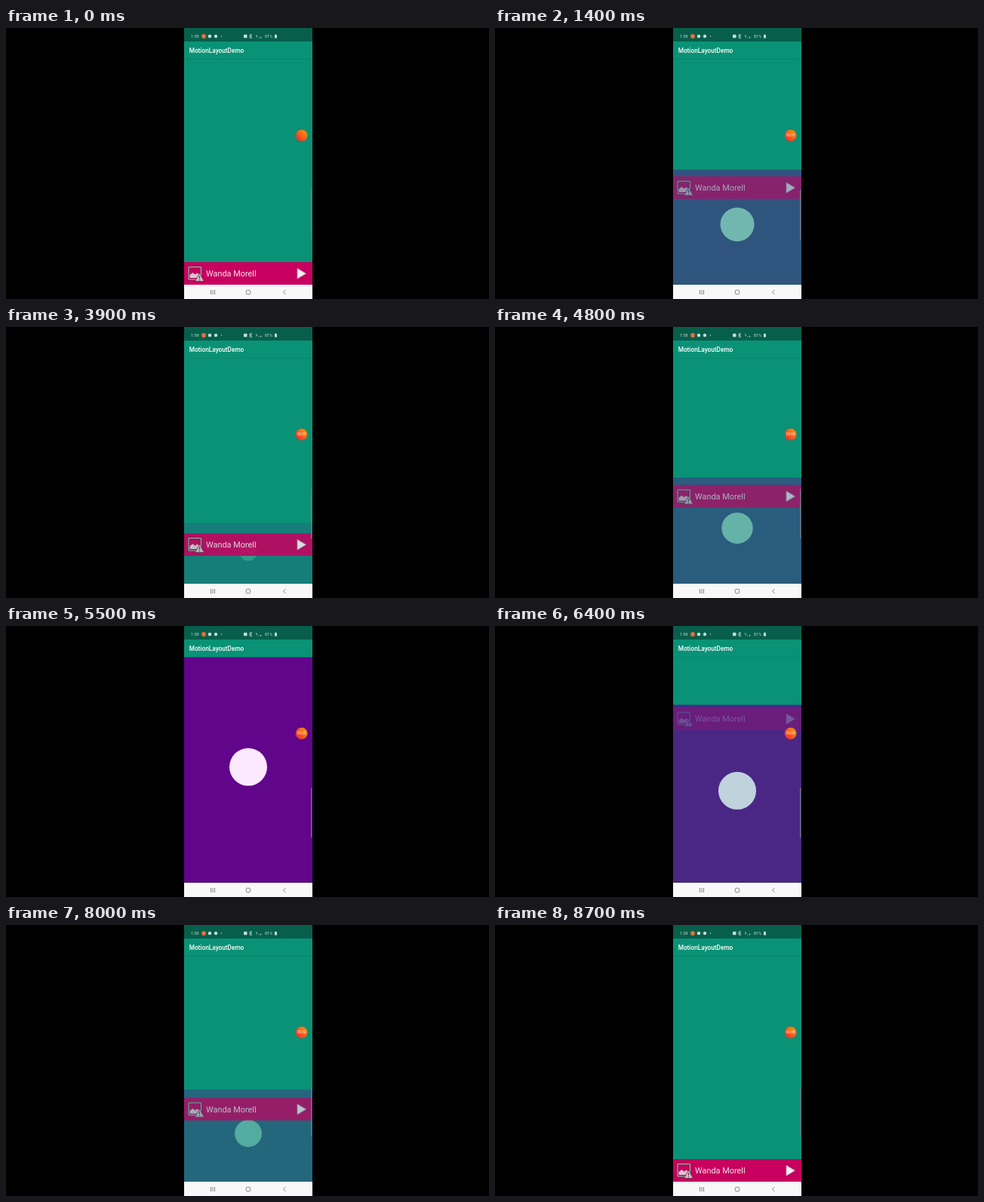
Recreate the animation shown at these times as an HTML page. Size 640 by 360 pixels, loop 8.9 s.

```html
<!DOCTYPE html>
<html lang="en">
<head>
<meta charset="utf-8">
<title>MotionLayoutDemo</title>
<style>
  html, body { margin: 0; width: 100%; height: 100%; overflow: hidden; background: #000; }
  svg { display: block; width: 100vw; height: 100vh; font-family: Roboto, sans-serif; }
</style>
</head>
<body>
<svg viewBox="0 0 640 360">
  <defs>
    <linearGradient id="glow" x1="0" y1="1" x2="1" y2="0">
      <stop offset=".1" stop-color="#f02c32"/>
      <stop offset=".9" stop-color="#fb9a08"/>
    </linearGradient>
  </defs>

  <rect width="640" height="360"/>
  <rect x="236" width="170" height="341" fill="#0a9276"/>
  <rect x="236" y="41" width="170" height="1" fill="#078067" opacity=".6"/>

  <!-- Expanding panel -->
  <g id="panel">
    <rect id="sheet" x="236" width="170" fill="#61058b"/>
    <rect x="236" y="340" width="170" height="1" fill="#2b0240" opacity=".6"/>
    <circle id="badge" cx="321" fill="#fce9ff"/>
  </g>

  <!-- Player bar, drawn relative to its top edge -->
  <g id="bar">
    <rect x="236" width="170" height="30" fill="#c8005f"/>
    <g stroke-linejoin="round">
      <rect x="242" y="6.5" width="16.5" height="16.5" fill="none" stroke="#5c2942" stroke-width="2.4"/>
      <rect x="242" y="6.5" width="16.5" height="16.5" fill="none" stroke="#d8b3c4"/>
      <path d="M243.5 21v-4l4-3 3 2.5 3-2 3 2v4.5z" fill="#e0c3d0"/>
      <path d="M256.5 14.5l6 11h-12z" fill="#d9b9c8" stroke="#5c2942" stroke-width=".8"/>
      <path d="M256.5 18.2v3.6m0 1.2v1.2" stroke="#5c2942" stroke-width="1.1"/>
    </g>
    <text x="265" y="19.2" font-size="10.9" fill="#fae3ee">Wanda Morell</text>
    <path d="M386 8.3v13.8l11.5-6.9z" fill="#f6eef2" stroke="#b8a0ac" stroke-width=".8" stroke-linejoin="round"/>
  </g>

  <!-- Status bar and title -->
  <rect x="236" width="170" height="18" fill="#075f4b"/>
  <g fill="#c4ddd5" font-size="5.5">
    <text x="245" y="13">1:59</text>
    <circle cx="262" cy="11" r="2.9" fill="#f06a3c"/>
    <circle cx="270" cy="11" r="2.3"/>
    <circle cx="278" cy="11" r="2.2"/>
    <circle cx="285.5" cy="11" r=".7"/>
    <rect x="315" y="8.7" width="4.5" height="4.5" rx="1"/>
    <path d="M322 9.3l4 3.4-2 1.5V8l2 1.3-4 3.4M331 9l2 2-2 1M334 13h1M337 13v-1h1v1z" fill="none" stroke="#c4ddd5" stroke-width=".7"/>
    <text x="343" y="13">81%</text>
    <rect x="356" y="8.8" width="3" height="4.6" rx=".5"/>
  </g>
  <text x="242.7" y="32.7" font-size="8.25" font-weight="500" fill="#fff">MotionLayoutDemo</text>

  <!-- Navigation bar -->
  <rect x="236" y="341" width="170" height="19" fill="#f8f8f8"/>
  <g fill="none" stroke="#777" stroke-width=".9">
    <path d="M271.5 348v6M274 348v6M276.5 348v6M370.5 348l-3 3 3 3"/>
    <rect x="318.3" y="348.3" width="5.4" height="5.4" rx="1.2"/>
  </g>

  <rect x="404" y="215" width="1.2" height="66" fill="#71777f"/>

  <!-- Recording timer -->
  <circle cx="391.7" cy="142.7" r="7.8" fill="url(#glow)" stroke="#9c4a3a" stroke-opacity=".5" stroke-width=".8"/>
  <text id="timer" x="391.7" y="144.3" font-size="4.6" text-anchor="middle" fill="#fff0e4"></text>
</svg>
<script>
  const LOOP = 8900, STEP = 100, BOTTOM = 341;
  // [time in ms, how far the panel is open]
  const drag = [
    [0, 0], [300, 0], [1100, .26], [1400, .422], [2000, .69], [2700, 1],
    [3050, 1], [3900, .137], [4150, 0], [4500, 0], [5300, 1],
    [5600, 1], [6500, .72], [7400, .663], [8500, 0], [LOOP, 0]
  ];
  const byId = id => document.getElementById(id);
  const [panel, sheet, badge, bar, timer] = ['panel', 'sheet', 'badge', 'bar', 'timer'].map(byId);
  const set = (el, attrs) => {
    for (const name in attrs) el.setAttribute(name, attrs[name]);
  };

  function openness(t) {
    const i = drag.findIndex(([time]) => time > t);
    const [t0, p0] = drag[i - 1], [t1, p1] = drag[i];
    return p0 + (p1 - p0) * (t - t0) / (t1 - t0);
  }

  function draw(t) {
    const p = openness(t);
    const top = 295 - 253.4 * p, height = BOTTOM - top;
    const scale = Math.min(1, height / 170);
    set(panel, { opacity: p });
    set(sheet, { y: top, height });
    set(badge, { cy: top + height / 2 - 4 * scale, r: 25 * scale });
    set(bar, { opacity: 1 - p, transform: `translate(0 ${311 - 270 * p})` });
    timer.textContent = t < STEP ? '' : '00:0' + Math.floor(t / 1000);
  }

  function tick() {
    const t = performance.now() % LOOP;
    draw(Math.min(Math.floor(t / STEP) * STEP, LOOP - 2 * STEP));
    requestAnimationFrame(tick);
  }
  tick();
</script>
</body>
</html>
```
